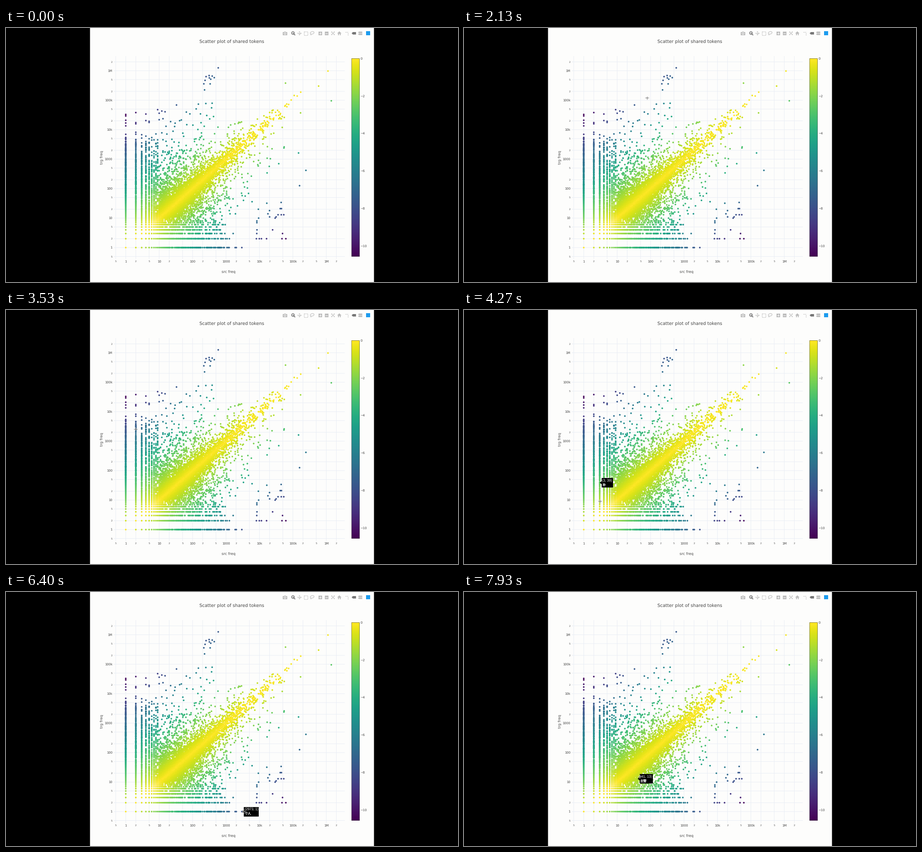
A matplotlib script for the animation above (8000 ms loop, 998 by 561 pixels).

```python
import numpy as np
import matplotlib.pyplot as plt
from matplotlib.animation import FuncAnimation
from matplotlib.patches import Circle, Ellipse, Polygon, Rectangle

W, H, DPI = 998, 561, 64
FRAMES, INTERVAL = 200, 40
TICK = 1000 / 15  # the pointer moves in steps of this many ms

PAPER, INK, GRID = "#fdfdfc", "#444444", "#eaeef5"
ICON, ICON_ON = "#bcbcbc", "#757575"
LEFT, DECADE_X = 264.4, 73.8
BASE, DECADE_Y = 485.0, 65.1
LOWEST = -10.57

plt.rcParams["text.hinting"] = "no_hinting"
fig = plt.figure(figsize=(W / DPI, H / DPI), dpi=DPI, facecolor="black")
ax = fig.add_axes([0, 0, 1, 1])


def pt(px):
    return px * 72 / DPI


def to_px(x, y):
    return LEFT + DECADE_X * np.log10(x), BASE - DECADE_Y * np.log10(y)


def reset_stage():
    ax.clear()
    ax.axis("off")
    ax.set(xlim=(0, W), ylim=(H, 0))


def line(xs, ys, color, width=1.0, **kw):
    return ax.plot(xs, ys, color=color, lw=pt(width), solid_capstyle="butt", **kw)[0]


def rect(x0, y0, x1, y1, color, **kw):
    return ax.add_patch(Rectangle((x0, y0), x1 - x0, y1 - y0, fc=color, lw=0, **kw))


def outline(shape, width, color=ICON, **kw):
    shape.set(fill=False, ec=color, lw=pt(width), **kw)
    ax.add_patch(shape)


def poly(points, color):
    ax.add_patch(Polygon(points, fc=color, lw=0))


def label(x, y, text, size, ha="center"):
    ax.text(x, y + 0.36 * size, text, size=pt(size), color=INK, ha=ha,
            va="baseline", family="DejaVu Sans")


# ---------------------------------------------------------------- data

# hover start in ms, src, trg, token
HOLD = 500
HOVERS = [
    (1600, 585, 1253141, "的"),
    (4050, 3, 39, "补"),
    (4900, 13, 2, "裂谷"),
    (6200, 2973, 1, "个人"),
    (7600, 41, 13, "主管"),
]

# the most distant points, as powers of ten
FAR = [(6.05, 5.99), (5.77, 5.48), (6.15, 4.98), (4.78, 5.58), (5.23, 4.57),
       (5.39, 2.62), (5.17, 3.21), (5.2, 2.1)]


def rare_tokens(rng):
    """Columns and rows of tokens seen fewer than ten times on one side."""
    for k in range(1, 10):
        n_col, n_row = int(1000 / k ** 0.95), int(430 / k ** 0.6)
        col = 4.03 * (1 - np.sqrt(rng.random(n_col)))
        row = (3.45 - 0.06 * k) * (1 - np.sqrt(rng.random(n_row)))
        yield np.column_stack([np.full(n_col, np.log10(k)), col])
        yield np.column_stack([row, np.full(n_row, np.log10(k))])


def common_tokens(rng):
    """A band along the diagonal and a wide halo on both sides of it."""
    mid = 1 + rng.exponential(0.69, 5600)
    gap = rng.normal(0, 0.18, mid.size)
    band = np.column_stack([mid - gap / 2, mid + gap / 2])[mid < 4.6]
    yield band[(band >= 1).all(axis=1)]

    for count, spread, above in ((1750, 0.49, True), (1400, 0.43, False)):
        low = 1 + rng.exponential(0.62, count)
        high = low + rng.exponential(spread, count)
        pair = np.column_stack([low, high] if above else [high, low])
        yield pair[high < 4.5]


def outliers(rng):
    def patch(n, x0, x1, y0, y1):
        return rng.uniform((x0, y0), (x1, y1), (n, 2))

    yield rng.normal((2.5, 5.65), (0.08, 0.17), (10, 2))
    yield patch(18, 0.7, 2.6, 4.0, 4.9)
    yield patch(24, 3.9, 4.8, 0, 1.7)
    yield patch(8, 4.0, 4.8, 2.5, 4.2)
    yield np.column_stack([np.log10(rng.integers(1, 6, 12)), rng.uniform(4.1, 4.6, 12)])
    tail = rng.uniform(4.4, 5.3, (12, 1))
    yield tail + rng.normal(0, 0.06, (12, 2))


def make_points():
    rng = np.random.default_rng(11)
    grid = [(a, b) for a in range(1, 13) for b in range(1, 13)]
    logs = [*rare_tokens(rng), *common_tokens(rng), *outliers(rng), FAR]
    points = np.vstack([10 ** np.vstack(logs), grid, [h[1:3] for h in HOVERS]])
    return rng.permutation(np.unique(np.maximum(np.rint(points), 1), axis=0)).T


# ---------------------------------------------------------------- static plot

def tick_values():
    for power in range(-1, 7):
        for digit in (1, 2, 5):
            value = digit * 10.0 ** power
            if 0.5 <= value <= 2e6:
                yield digit, value


def tick_text(digit, value):
    if digit > 1:
        return str(digit), 5.2
    if value >= 1e6:
        return f"{value / 1e6:.0f}M", 6.9
    if value >= 1e4:
        return f"{value / 1e3:.0f}k", 6.9
    return f"{value:.0f}", 6.9


def draw_axes():
    for digit, value in tick_values():
        x, y = to_px(value, value)
        text, size = tick_text(digit, value)
        line([x, x], [62, 510], GRID, zorder=1, snap=False)
        line([238, 748], [y, y], GRID, zorder=1, snap=False)
        label(x, 515.5, text, size)
        label(235, y, text, size, "right")
    label(498.5, 29.8, "Scatter plot of shared tokens", 9.85)
    label(491, 537.5, "src freq", 8.1)
    ax.text(211.5, 286, "trg freq", size=pt(8.1), color=INK, rotation=90,
            ha="center", va="center", family="DejaVu Sans")


def draw_colorbar():
    x0, x1, top, bottom = 763, 780.4, 67.5, 504.7
    ax.imshow(np.linspace(1, 0, 256)[:, None], cmap="viridis", aspect="auto",
              extent=(x0, x1, bottom, top), interpolation="bilinear")
    outline(Rectangle((x0, top), x1 - x0, bottom - top), 0.6, INK, zorder=3, snap=False)
    for v in range(0, -11, -2):
        y = top + (bottom - top) * v / LOWEST
        label(782.5, y, str(v).replace("-", "\u2212"), 6.9, "left")


def tag(x, y, w, h, color):
    poly([(x - w, y), (x - w + h, y - h), (x + w, y - h), (x + w, y + h),
          (x - w + h, y + h)], color)


def four_arrows(x, y, turn, reach):
    center = np.array([x, y])
    for a in turn + np.arange(4) * np.pi / 2:
        along, side = np.array([[np.cos(a), np.sin(a)], [-np.sin(a), np.cos(a)]])
        neck = center + along * (reach - 2)
        line(*zip(center, neck), ICON)
        poly([center + along * reach, neck + side * 1.8, neck - side * 1.8], ICON)


def draw_toolbar():
    y = 11.7
    # camera
    rect(611, y - 3, 621, y + 4, ICON)
    rect(613.8, y - 4.2, 618.2, y - 3, ICON)
    ax.add_patch(Circle((616, y + 0.5), 2.1, fc=ICON, ec=PAPER, lw=pt(1)))
    # magnifier
    outline(Circle((633.6, y - 0.6), 3), 1.5, ICON_ON)
    line([635.7, 638.5], [y + 1.5, y + 4.3], ICON_ON, 1.8)
    line([632, 635.2], [y - 0.6, y - 0.6], ICON_ON, 0.9)
    line([633.6, 633.6], [y - 2.2, y + 1], ICON_ON, 0.9)
    # pan and autoscale
    four_arrows(648, y, 0, 4.6)
    four_arrows(722, y, np.pi / 4, 5.4)
    # box and lasso selection
    outline(Rectangle((658, y - 4), 8, 8), 1.1, ls=(0, (1.6, 0.9)))
    outline(Ellipse((676, y - 1), 8.6, 5.4, angle=-15), 1.1)
    line([673.2, 672.6, 674.2], [y + 1.2, y + 2.8, y + 4.2], ICON, 1.1)
    # zoom in and out
    for x in (694, 708):
        rect(x - 4.2, y - 4.2, x + 4.2, y + 4.2, ICON)
        line([x - 2.5, x + 2.5], [y, y], PAPER, 1.2)
    line([694, 694], [y - 2.5, y + 2.5], PAPER, 1.2)
    # home
    poly([(731.2, y + 0.3), (736, y - 4.4), (740.8, y + 0.3)], ICON)
    rect(732.6, y, 739.4, y + 4, ICON)
    rect(735, y + 1.4, 737, y + 4, PAPER)
    # spikes and hover modes
    line([749, 756], [y - 2.6, y - 2.6], ICON, 1.1, ls=(0, (2, 1)))
    line([755, 755], [y - 1, y + 4], ICON, 1.1, ls=(0, (2, 1)))
    tag(768, y, 4.8, 2.7, ICON_ON)
    for dy in (-2.1, 2.1):
        tag(782, y + dy, 4.6, 1.7, ICON)
    rect(795.3, y - 4.5, 804.2, y + 4.5, "#1c9bee")


def paint_static():
    reset_stage()
    rect(185.5, 0, 812.5, H, PAPER, zorder=0, snap=False)
    draw_axes()
    draw_colorbar()
    draw_toolbar()
    src, trg = make_points()
    ax.scatter(*to_px(src, trg), c=-np.abs(np.log(src / trg)), s=pt(3.6) ** 2,
               cmap="viridis", vmin=LOWEST, vmax=0, linewidths=0, zorder=2)
    ax.set(xlim=(0, W), ylim=(H, 0))
    fig.canvas.draw()
    return np.asarray(fig.canvas.buffer_rgba())[..., :3].copy()


# ---------------------------------------------------------------- motion

# pointer path: ms, x, y
PATH = np.array([
    (200, 424, 350), (530, 447, 228), (930, 447, 228), (1330, 468, 91),
    (1470, 468, 91), (2870, 333, 225), (3530, 286, 262), (4270, 300, 423),
    (4870, 340, 461), (5270, 402, 461), (6400, 525, 485), (6870, 525, 485),
    (7930, 388, 408),
]).T

picture = paint_static()
reset_stage()
ax.imshow(picture, extent=(0, W, H, 0), aspect="auto", interpolation="nearest")
ax.set(xlim=(0, W), ylim=(H, 0))


def tip_text(family):
    return ax.text(0, 0, "", size=pt(7.5), color="white", family=family,
                   va="baseline", zorder=5)


arrow = ax.add_patch(Polygon([(0, 0)] * 3, fc="black", lw=0, zorder=4))
box = rect(0, 0, 1, 1, "black", zorder=4)
coords, token = tip_text("Liberation Sans"), tip_text("Noto Sans CJK JP")
tip = (arrow, box, coords, token)
pointer = [line([], [], color, width, zorder=6, alpha=alpha)
           for color, width, alpha in (("white", 2.0, 0.6), ("#555555", 0.9, 0.9))]


def short(v):
    if v >= 1e6:
        return f"{v / 1e6:.4g}M"
    return f"{v / 1e3:.4g}k" if v >= 1e4 else str(v)


def show_tip(src, trg, word):
    x, y = to_px(src, trg)
    left = x + 4.3
    arrow.set_xy([(x, y), (left + 0.3, y - 3.5), (left + 0.3, y + 3.5)])
    coords.set_text(f"({short(src)}, {short(trg)})")
    coords.set_position((left + 1.5, y - 2.2))
    token.set_text(word)
    token.set_position((left + 1.5, y + 7.6))
    scale = W / fig.bbox.width
    wide = max(t.get_window_extent().width for t in (coords, token)) * scale
    box.set_bounds(left, y - 10.5, wide + 3, 21)


def draw(i):
    t = (i * INTERVAL + 30) // TICK * TICK
    current = next((h for h in HOVERS if h[0] <= t < h[0] + HOLD), None)
    for part in tip:
        part.set_visible(current is not None)
    if current:
        show_tip(*current[1:])

    x, y = (np.interp(t, PATH[0], p) for p in PATH[1:])
    for mark in pointer:
        mark.set_visible(t >= 199)
        mark.set_data([x - 3.7, x + 3.7, np.nan, x, x], [y, y, np.nan, y - 3.7, y + 3.7])
    return (*tip, *pointer)


anim = FuncAnimation(fig, draw, frames=FRAMES, interval=INTERVAL, repeat=True)
plt.show()
```
